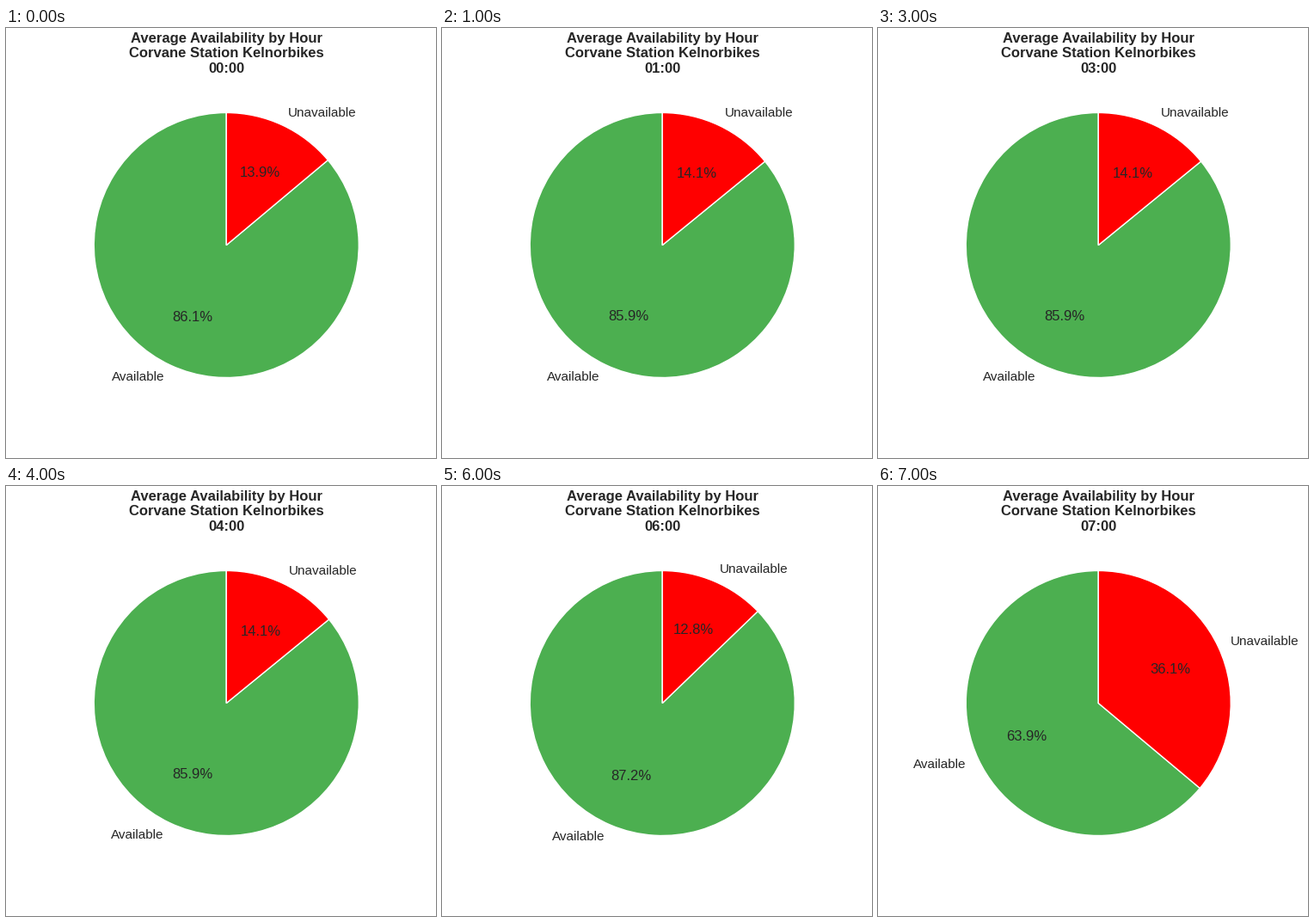
These frames come from a looping animation (500x500 px, 8 s). A matplotlib script:

```python
import matplotlib.pyplot as plt
from matplotlib.animation import FuncAnimation

plt.rcParams.update({
    "font.family": "Liberation Sans",
    "font.size": 12,
    "text.color": "#262626",
})

# Share of unavailable bikes in percent, one value per hour
UNAVAILABLE = [13.9, 14.1, 14.1, 14.1, 14.1, 13.6, 12.8, 36.1]

fig, ax = plt.subplots(figsize=(5, 5), dpi=100, facecolor="white")


def draw(hour):
    ax.clear()
    share = UNAVAILABLE[hour]
    _, labels, _ = ax.pie(
        [100 - share, share],
        labels=["Available", "Unavailable"],
        colors=["#4CAF50", "#FF0000"],
        autopct="%1.1f%%",
        startangle=90,
        wedgeprops={"edgecolor": "white", "linewidth": 1},
    )
    for label in labels:
        label.set_fontsize(11)
    ax.set_title(
        f"Average Availability by Hour\nCorvane Station Kelnorbikes\n{hour:02d}:00",
        fontsize=12, fontweight="bold", pad=6,
    )


anim = FuncAnimation(fig, draw, frames=len(UNAVAILABLE), interval=1000,
                     repeat=True, repeat_delay=0)
plt.show()
```
